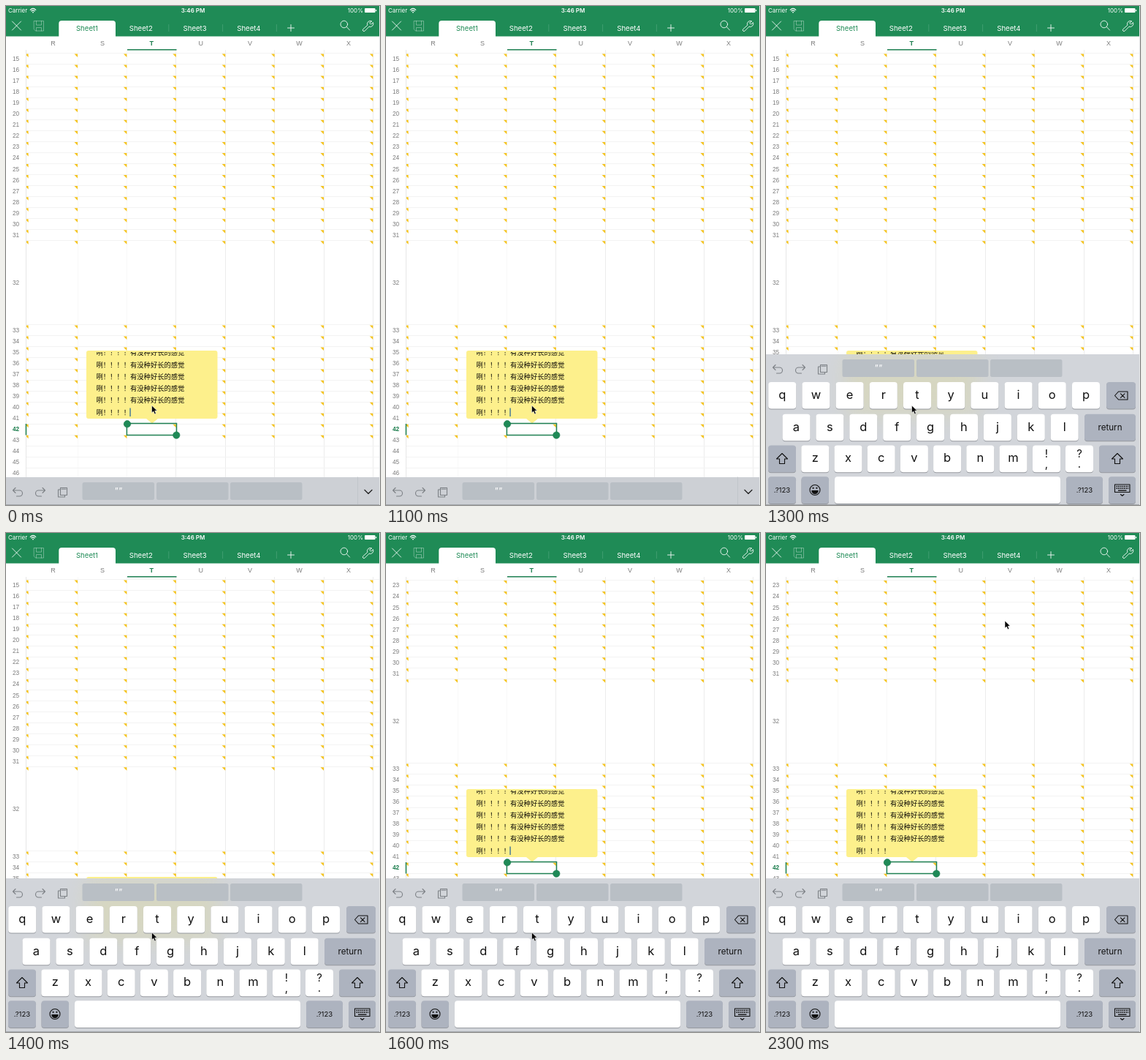
Animation, 512 px wide and 682 px high, one loop 2400 ms. Source, as an HTML page:

```html
<!DOCTYPE html>
<html lang="zh-CN">
<head>
<meta charset="utf-8">
<style>
  html, body { margin: 0; width: 100%; height: 100%; overflow: hidden; background: #fff; }
  svg { display: block; width: 100vw; height: 100vh; }
  text { font-family: Inter, Roboto, sans-serif; text-anchor: middle; }
  .num { font-family: "Liberation Sans", Arial, sans-serif; font-size: 8.3px; fill: #7c7c7c; }
  .col { font-size: 9px; }
  .on { font-weight: bold; fill: #1b7d4d; }
  .note { font-family: "Noto Sans CJK SC", "Noto Sans CJK", sans-serif; font-size: 9.3px; text-anchor: start; fill: #0c0b06; }
  .line { fill: none; stroke-linecap: round; stroke-linejoin: round; }
</style>
</head>
<body>
<svg id="stage" viewBox="0 0 512 682" preserveAspectRatio="none">
  <defs>
    <clipPath id="sheetClip"><rect y="60" width="512" height="622"/></clipPath>
    <clipPath id="cellClip"><rect x="27" y="0" width="485" height="900"/></clipPath>
    <clipPath id="noteClip"><rect x="110" y="473" width="180" height="91"/></clipPath>
    <clipPath id="boardClip"><rect width="512" height="260"/></clipPath>
    <filter id="soft" x="-30%" y="-30%" width="160%" height="160%"><feGaussianBlur stdDeviation="15"/></filter>
  </defs>
  <rect width="512" height="682" fill="#fff"/>

  <g clip-path="url(#sheetClip)">
    <g id="sheet">
      <g id="grid" clip-path="url(#cellClip)"></g>
      <g id="rows"></g>
      <rect x="26.700" y="571" width="1.500" height="15.500" fill="#1b7d4d"/>
      <path d="M110 474a3 3 0 0 1 3-3H286.500a3 3 0 0 1 3 3V561a3 3 0 0 1-3 3H208L200 570.500L192 564H113a3 3 0 0 1-3-3Z" fill="#fdf08c"/>
      <g id="noteText" clip-path="url(#noteClip)"></g>
      <rect id="caret" x="169.400" y="549.500" width="1.300" height="11.500" fill="#2f6a98"/>
      <rect x="165.400" y="570.500" width="68.100" height="16" fill="none" stroke="#1e8052" stroke-width="1.500"/>
      <g fill="#1f8a57" stroke="#1a7a4b" stroke-width=".6">
        <circle cx="166" cy="571.300" r="4.700"/><circle cx="233.300" cy="586.600" r="4.700"/>
      </g>
    </g>
  </g>

  <!-- header -->
  <rect y="41" width="512" height="19" fill="#fff"/>
  <g id="cols"></g>
  <rect x="166" y="59" width="67.500" height="1.500" fill="#1e8052"/>
  <rect width="512" height="41.500" fill="#1f8b56"/>
  <path d="M72.300 42V24a4 4 0 0 1 4-4H146a4 4 0 0 1 4 4V42Z" fill="#fff"/>
  <g id="tabs"></g>
  <g fill="#fff" font-size="8">
    <text x="3" y="8.800" style="text-anchor:start">Carrier</text>
    <text x="256" y="8.800" font-weight="600">3:46 PM</text>
    <text x="489" y="8.800" style="text-anchor:end">100%</text>
    <rect x="491" y="3" width="14.500" height="6" rx="1"/><rect x="506" y="5" width="1.200" height="2.200"/>
    <circle cx="37" cy="8.600" r=".9"/>
  </g>
  <g class="line" stroke="#fff" stroke-width=".85">
    <path d="M33.200 5.300Q37 1.600 40.800 5.300M34.800 7Q37 4.900 39.200 7" stroke-width="1.100"/>
    <path d="M8.500 21L20.500 33M20.500 21L8.500 33"/>
    <path d="M390 25.500V34.500M385.500 30H394.500"/>
    <circle cx="462.800" cy="25" r="4.800"/><path d="M466.400 28.600L470.500 33"/>
    <path d="M500.500 20.700a4.300 4.300 0 0 0-5.700 5.600L488.800 31.700a1.700 1.700 0 0 0 2.400 2.400L497 28.200a4.300 4.300 0 0 0 5.500-5.700L499.800 25L497.900 23.300Z"/>
    <path d="M38.500 20.500H51.500V34H40.500L38.500 32ZM41.500 20.500V26H48.500V20.500M41.500 34V29.500H48.500V34" opacity=".4"/>
  </g>

  <!-- keyboard, laid out from its own top edge -->
  <g id="board">
    <rect id="back" width="512" height="260"/>
    <g clip-path="url(#boardClip)"><rect id="glow" x="110" width="180" height="84" fill="#e6dc62" opacity=".2" filter="url(#soft)"/></g>
    <g id="slots" fill="#b9bfc5"></g>
    <text x="153.500" y="22.500" font-size="12" font-style="italic" fill="#fff">""</text>
    <g class="line" stroke="#7d8186" stroke-width="1.100">
      <path d="M13 14.500L9.500 18L13 21.500M9.500 18H18.500a4 4 0 0 1 0 8H14.500"/>
      <path d="M50 14.500L53.500 18L50 21.500M53.500 18H44.500a4 4 0 0 0 0 8H48.500"/>
      <path d="M74.500 14.500H83.500V24.500H74.500ZM74.500 17H71.500V27H80.500V24.500M76 16.300H82"/>
    </g>
    <g id="chevron" class="line">
      <path d="M481.500 0V38" stroke="#c1c5ca"/>
      <path d="M491 17.500L496 22.500L501 17.500" stroke="#222" stroke-width="1.300"/>
    </g>
    <g id="keys"></g>
  </g>
  <rect y="681" width="512" height="1" fill="#a4a8ad"/>
  <rect x="511" width="1" height="682" fill="#e6e8e9"/>

  <path id="pointer" d="M0 0V10L2.300 8L4 11.700L5.800 10.900L4.200 7.300L7.300 7.100Z" fill="#000" stroke="#fff" stroke-width=".6"/>
</svg>
<script>
const NS = "http://www.w3.org/2000/svg";
const $ = id => document.getElementById(id);

function add(parent, tag, attrs, text) {
  const el = document.createElementNS(NS, tag);
  for (const k in attrs) el.setAttribute(k, attrs[k]);
  if (text !== undefined) el.textContent = text;
  parent.appendChild(el);
  return el;
}

// spreadsheet
const colEdge = i => 30.6 + 67.4 * i;
const rowTop = n => n < 33 ? 64.9 + (n - 15) * 15.05 : 435.9 + (n - 33) * 15.03;

for (let i = 1; i < 8; i++) {
  const x = Math.floor(colEdge(i)) + .5;
  add($("grid"), "path", { d: `M${x} 0V900`, stroke: i < 3 ? "#f8f8f8" : "#ececec" });
}
for (let n = 14; n <= 58; n++) {
  const y = rowTop(n), line = Math.floor(y) + .5;
  add($("grid"), "path", { d: `M27 ${line}H512`, stroke: "#f3f3f3" });
  if (n < 44) for (let i = 0; i < 8; i++)
    add($("grid"), "path", { d: `M${colEdge(i) - 4.5} ${y + .6}h4.500v4.500Z`, fill: "#f5c31c" });
  const mid = (y + rowTop(n + 1)) / 2;
  add($("rows"), "text", { x: 13.5, y: mid + 2.6, class: n === 42 ? "num on" : "num" }, n);
}
add($("rows"), "path", { d: "M27.500 0V900", stroke: "#e6e6e6" });

[..."RSTUVWX"].forEach((c, i) =>
  add($("cols"), "text", { x: 64.5 + 67.4 * i, y: 54, class: c === "T" ? "num col on" : "num col" }, c));

for (let i = 0; i < 4; i++) {
  add($("tabs"), "text", { x: 111 + 73.8 * i, y: 34, "font-size": 9.6, fill: i ? "#fff" : "#1f8b56" }, "Sheet" + (i + 1));
  if (i) add($("tabs"), "path", { d: `M${149 + 73.8 * i} 25V35`, stroke: "#4aa276", "stroke-width": .8 });
}

const shout = "咧！！！！";
for (let i = 0; i < 6; i++)
  add($("noteText"), "text", { x: 123.5, y: 477.2 + 16.3 * i, class: "note" }, shout + (i < 5 ? "有没种好长的感觉" : ""));

// keyboard
const keys = $("keys");
const rowY = [38, 81.7, 124.6, 167.3];
for (const x of [104.5, 206, 307]) add($("slots"), "rect", { x, y: 7, width: 98.5, height: 24, rx: 2.5 });

function key(x, row, w, dark) {
  const box = { x, y: rowY[row] + 1, width: w, height: 36.6, rx: 4 };
  add(keys, "rect", { ...box, fill: "#96999f" });
  add(keys, "rect", { ...box, y: rowY[row], fill: dark ? "#adb3bf" : "#fff" });
}
function label(x, y, size, s) {
  add(keys, "text", { x, y, "font-size": size, fill: "#111" }, s);
}
function letters(s, row, x0, step) {
  [...s].forEach((c, i) => {
    const x = x0 + step * i;
    key(x - 19, row, 38);
    label(x, rowY[row] + 22.8, 16.5, c);
  });
}
function icon(d, fill = "none") {
  add(keys, "path", { d, class: "line", style: `fill:${fill}`, stroke: "#111", "stroke-width": 1.1 });
}

letters("qwertyuiop", 0, 22.2, 46.2);
letters("asdfghjkl", 1, 41.5, 45.9);
letters("zxcvbnm", 2, 67.3, 45.2);
[[384, "!", ","], [429, "?", "."]].forEach(([x, up, low]) => {
  key(x - 19, 2, 38);
  label(x, 140.5, 15, up);
  label(x, 155, 15, low);
});
[[466, 0, 40], [436, 1, 70], [3, 2, 38], [456, 2, 50], [3, 3, 38], [48.5, 3, 37.5], [411, 3, 50], [469, 3, 37]]
  .forEach(k => key(...k, true));
key(94, 3, 309);
label(471, 104, 11.6, "return");
label(22, 188.8, 9.6, ".?123");
label(436, 188.8, 9.6, ".?123");
icon("M477.500 56.500L482.500 51H495V62H482.500ZM485.500 53.800L491 59.300M491 53.800L485.500 59.300");
for (const x of [22, 481]) icon(`M${x} 135.500l7.500 7.500h-4v6.500h-7v-6.500h-4Z`);
icon("M60 185.500a7 7 0 1 1 14 0a7 7 0 1 1 -14 0Z");
icon("M62.800 186.500H71.200A4.200 4.200 0 0 1 62.800 186.500Z", "#111");
for (const x of [64.6, 69.4]) add(keys, "circle", { cx: x, cy: 182.8, r: 1.1, fill: "#111" });
icon("M477.500 178H498V188.500H477.500ZM485.500 191.500L487.700 193.500L490 191.500");
add(keys, "path", { d: "M479.500 180.500H496.500M479.500 183.200H496.500", stroke: "#111", "stroke-width": 1.5, "stroke-dasharray": "1.700 1" });
add(keys, "path", { d: "M482 186.200H493.500", stroke: "#111", "stroke-width": 1.4 });

// motion
const LOOP = 2400, STEP = 100;

function track(t, points) {
  let [t0, v0] = points[0];
  for (const [t1, v1] of points) {
    if (t <= t1) return t1 === t0 ? v1 : v0 + (v1 - v0) * (t - t0) / (t1 - t0);
    t0 = t1; v0 = v1;
  }
  return v0;
}

const boardTop = [[0, 644], [1100, 644], [1200, 578], [1300, 476], [1400, 472]];
const scroll = [[0, 0], [1300, 0], [1400, 1], [1500, 76], [1600, 121]];
const blink = [[0, 1], [100, .8], [200, .8], [400, 0], [500, 0], [800, 1], [2000, 1], [2200, 0]];
const mouseX = [[0, 199.5], [1800, 199.5], [1900, 212], [2000, 245], [2100, 289], [2200, 319], [2300, 327]];
const mouseY = [[0, 546], [1800, 546], [1900, 515], [2000, 420], [2100, 270], [2200, 152], [2300, 120]];

function draw(ms) {
  const t = Math.floor(ms % LOOP / STEP) * STEP;
  const top = track(t, boardTop), up = track(t, scroll), open = top < 644;
  $("sheet").setAttribute("transform", `translate(0 ${-up})`);
  $("caret").setAttribute("opacity", track(t, blink));
  $("board").setAttribute("transform", `translate(0 ${top})`);
  $("back").setAttribute("fill", open ? "#d2d5da" : "#cdd0d5");
  $("glow").setAttribute("y", 476 - up - top);
  $("glow").setAttribute("visibility", open && up < 90 ? "visible" : "hidden");
  $("chevron").setAttribute("visibility", open ? "hidden" : "visible");
  $("keys").setAttribute("visibility", open ? "visible" : "hidden");
  $("pointer").setAttribute("transform", `translate(${track(t, mouseX)} ${track(t, mouseY)})`);
}

const start = performance.now();
function tick() {
  draw(performance.now() - start);
  requestAnimationFrame(tick);
}
draw(0);
requestAnimationFrame(tick);
</script>
</body>
</html>
```
